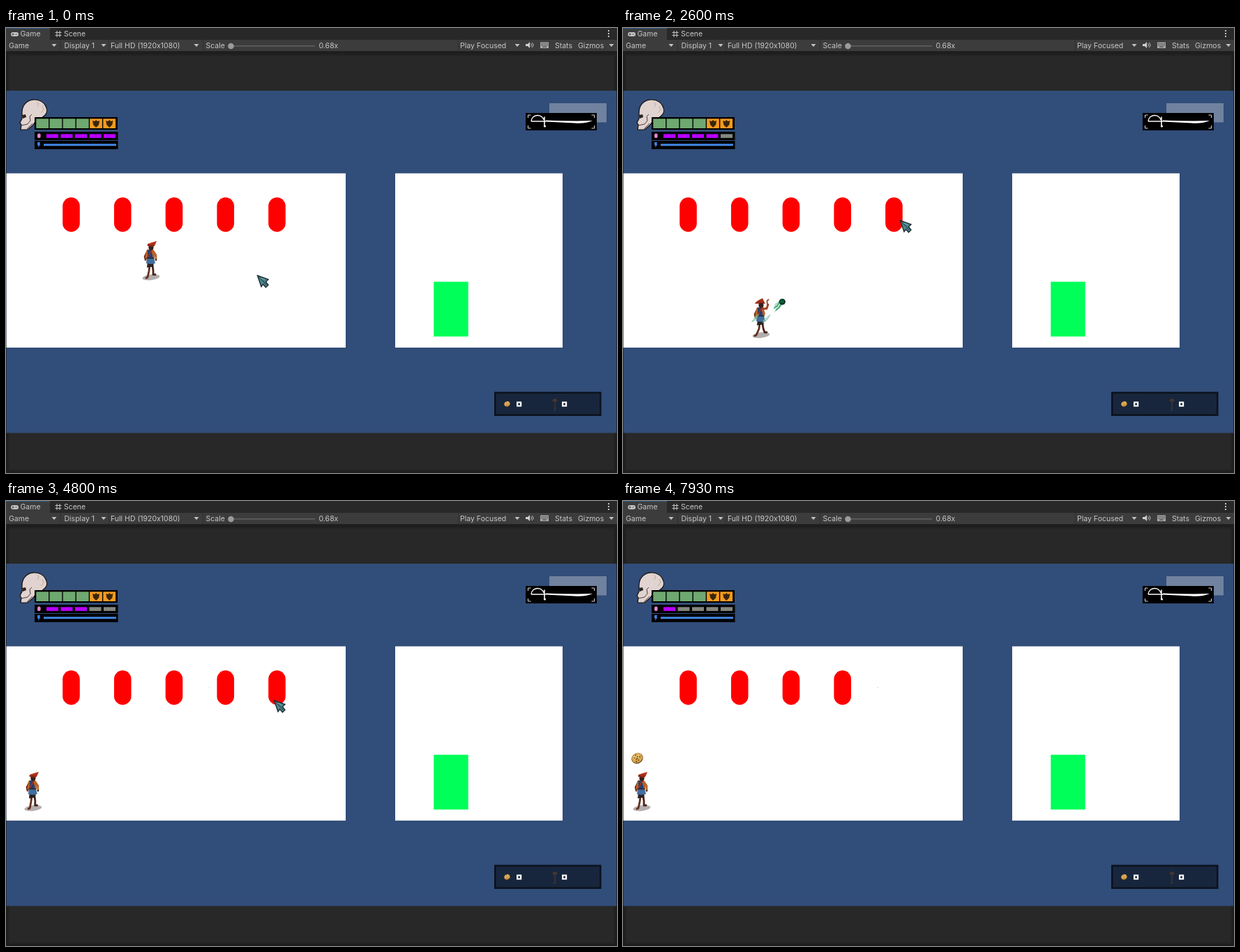
An HTML page with a canvas that plays this animation: 876x639 px, repeating every 7.99 s.

```html
<!DOCTYPE html>
<html lang="en">
<head>
<meta charset="utf-8">
<title>Game view</title>
<style>
html, body { margin: 0; width: 876px; height: 639px; overflow: hidden; background: #282828; }
canvas { display: block; }
</style>
</head>
<body>
<canvas id="stage" width="876" height="639"></canvas>
<script>
const g = document.getElementById('stage').getContext('2d');
const LOOP = 7990, STEP = LOOP / 120, SPEED = 0.375;
const ENEMIES = 5, enemyX = i => 93.5 + i * 73.75;

// key points: [ms, x, y]
const heroPath = [[250, 207, 360], [740, 207, 400], [1300, 168, 364], [2450, 197, 443], [2790, 197, 443],
  [3531, 112, 443], [3940, 112, 443], [5000, 20, 443], [5700, 20, 443], [5950, 26, 443]];
const cursorPath = [[0, 360, 355], [450, 412, 330], [1270, 387, 302], [2600, 397, 276], [3200, 396, 278],
  [3930, 322, 300], [4800, 384, 286], [6750, 389, 292], [7750, 330, 650]];
const lootPath = [[7150, 382, 282], [7900, 20.5, 369.5]];

const linear = k => k, smooth = k => k * k * (3 - 2 * k);
function along(keys, t, ease = linear) {
  let i = 0;
  while (i < keys.length - 2 && t > keys[i + 1][0]) i++;
  const [[t0, x0, y0], [t1, x1, y1]] = [keys[i], keys[i + 1]];
  const part = (t - t0) / (t1 - t0), k = ease(Math.max(0, Math.min(1, part)));
  return {
    x: x0 + (x1 - x0) * k, y: y0 + (y1 - y0) * k,
    moving: part > 0 && part < 1 && (x0 !== x1 || y0 !== y1)
  };
}

// a shot flies from the hero to the near side of an enemy
const shots = [[2490, 4], [3531, 3], [5100, 4], [6044, 4]].map(([fired, enemy]) => {
  const hero = along(heroPath, fired), x = hero.x, y = hero.y - 25;
  const dx = enemyX(enemy) - 14 - x, dy = 277 - y, len = Math.hypot(dx, dy);
  return { fired, x, y, len, ux: dx / len, uy: dy / len, angle: Math.atan2(dy, dx), hit: fired + len / SPEED };
});
const killed = shots.at(-1).hit;

function rect(x, y, w, h, color) {
  g.fillStyle = color;
  g.fillRect(x, y, w, h);
}
function pill(x, y, w, h, r, color) {
  g.beginPath();
  g.roundRect(x, y, w, h, r);
  g.fillStyle = color;
  g.fill();
}
function oval(x, y, rx, ry, color, turn = 0) {
  g.beginPath();
  g.ellipse(x, y, rx, ry, turn, 0, 7);
  g.fillStyle = color;
  g.fill();
}
function fill(d, color) {
  g.fillStyle = color;
  g.fill(new Path2D(d));
}
function line(d, color, width = 1) {
  g.strokeStyle = color;
  g.lineWidth = width;
  g.stroke(new Path2D(d));
}
function at(x, y, draw) {
  g.save();
  g.translate(x, y);
  draw();
  g.restore();
}

function toolbar() {
  rect(0, 0, 876, 639, '#282828');
  rect(0, 0, 63, 17, '#3c3c3c');
  rect(0, 0, 63, 1, '#2c5d87');
  rect(0, 17, 876, 16, '#3c3c3c');
  rect(0, 33, 876, 2, '#202020');
  for (const x of [78, 147, 282, 648]) rect(x, 17, 1, 16, '#303030');
  g.font = '10.5px Inter, sans-serif';
  g.fillStyle = '#c8c8c8';
  g.fillText('Game', 20.5, 12);
  g.fillText('Scene', 83, 12);
  for (const [label, x] of [['Game', 4], ['Display 1', 83.5], ['Full HD (1920x1080)', 150], ['Scale', 286.5],
    ['0.68x', 448.5], ['Play Focused', 651], ['Stats', 787], ['Gizmos', 820]]) g.fillText(label, x, 29);
  for (const x of [69, 140, 273, 733, 868]) fill(`M${x - 3.5} 23h7l-3.5 4z`, '#c4c4c4');
  rect(322, 25, 121, 1.5, '#626262');
  oval(322.5, 26, 4.3, 4.3, '#9b9b9b');
  pill(7, 6, 11, 6, 3, '#c4c4c4');
  line('M8.5 9h3M10 7.5v3M13.5 9h2', '#3c3c3c');
  line('M73 4v9M77 4v9M70.5 6.5h9M70.5 10.5h9', '#c4c4c4');
  for (const y of [3, 7, 11]) rect(863, y, 2, 2, '#c4c4c4');
  fill('M745 23h3l3-3v9l-3-3h-3z', '#d0d0d0');
  line('M752.5 22.5q2 2 0 4M754 21q4 3.500 0 7', '#d0d0d0');
  rect(766, 20.5, 12, 8.5, '#a8a8a8');
  for (let i = 0; i < 10; i++) rect(767 + i % 5 * 2.2, 22 + (i / 5 | 0) * 2.2, 1.2, 1.2, '#333');
  rect(769, 26.5, 6, 1, '#333');
  // soft dark rim
  for (let i = 0; i < 6; i++) {
    g.strokeStyle = `rgba(20, 20, 20, ${0.6 - i * 0.1})`;
    g.lineWidth = 1;
    g.strokeRect(i + 0.5, 35.5 + i, 875 - 2 * i, 603 - 2 * i);
  }
}

function room(t) {
  rect(0.6, 90, 874.6, 491.5, '#314d79');
  rect(0.6, 208.7, 486.4, 250.2, '#fff');
  rect(558, 208.7, 240, 250.2, '#fff');
  rect(613.3, 364.4, 49.4, 78.6, '#00ff59');
  for (let i = 0; i < ENEMIES - (t >= killed); i++) pill(enemyX(i) - 12.3, 243.3, 24.6, 49.4, 12.3, '#f00');
}

function skull() {
  const head = 'M23 121C23 108 33 102.500 42 103C57 104 62 119 56 125Q50 131 43 133L39 139L31 146H21L22 139L20 136L23 130Z';
  fill(head, '#e1d3cf');
  line(head, '#15100f', 1.2);
  fill('M23 125l5-1 1 4-5 2z', '#2a2222');
  line('M22 140l9-2 4-5-1-6 3-3M30 145l8-8', '#3a2f2d', 0.9);
  line('M44 106l3 3-2 4M52 112l2 5-4 5', '#b39f9a', 0.8);
}

function sabre() {
  rect(779, 108, 82, 27.5, '#70829f');
  rect(745, 122, 102, 25, '#000');
  for (const sx of [-1, 1]) for (const sy of [-1, 1]) {
    line(`M${796 + sx * 43.5} ${134.5 + sy * 9.5}h${sx * 4}v${-sy * 4}`, '#ddd');
  }
  fill('M774 132.500Q815 134 841 133Q832 137.500 815 136.500L774 134.500Z', '#fff');
  line('M753 134h21', '#eee', 1.6);
  line('M772 127.500v14', '#fff', 1.6);
  line('M753 134C754 123 769 123 771 132', '#fff', 1.4);
  oval(772.5, 141, 1.6, 1.6, '#fff');
}

function hud(t) {
  skull();
  rect(41, 128, 119, 18, '#000');
  for (let i = 0; i < 6; i++) {
    const x = 43.3 + i * 19.2, armor = i > 3;
    rect(x, 130.3, 17.8, 13.7, armor ? '#f49b1f' : '#6fa870');
    if (armor) fill(`M${x + 4} 133l3 1 2-2 2 2 3-1-1 6-4 4-4-4z`, '#3a260c');
  }
  for (const y of [149, 162]) rect(41, y, 119.5, 12, '#000');
  pill(45, 151.5, 4.6, 6.5, 2, '#e585cf');
  const left = ENEMIES - shots.filter(s => t >= s.fired).length;
  for (let i = 0; i < 5; i++) rect(58 + i * 20.5, 152.3, 17, 5.6, i < left ? '#b800ff' : '#83877f');
  fill('M45 164h4l-.5 3h1l-3.500 5 .5-3.500h-1.500z', '#3d7fe0');
  rect(54, 166.3, 104, 3, '#4389e6');
  sabre();

  rect(700, 522.5, 153.5, 34.5, '#0a111c');
  rect(702.5, 525, 148.5, 29.5, '#18263d');
  cookie(718.5, 540, 0.52);
  for (const x of [732, 797]) {
    rect(x, 536.5, 7.2, 7.2, '#fff');
    rect(x + 2.2, 538.7, 2.8, 2.8, '#18263d');
  }
  line('M787 537l-3-2 2-2 1 2 1-2 2 2zM787 538v11h-2', '#553b2b', 1.1);
}

function cookie(x, y, size) {
  at(x, y, () => {
    g.scale(size, size);
    oval(0, 0, 8.5, 7.4, '#6d481c', -0.5);
    oval(-0.2, -0.5, 7.8, 6.6, '#dca94f', -0.5);
    oval(-1, -2, 5, 3, '#edc777', -0.5);
    for (let i = 0; i < 8; i++) {
      const r = 1.9 * Math.sqrt(i);
      oval(r * Math.cos(i * 2.4), r * Math.sin(i * 2.4), 1.1, 0.9, '#704518');
    }
  });
}

function hero(t) {
  const { x, y, moving } = along(heroPath, t);
  const shot = shots.find(s => t >= s.fired - 60 && t < s.fired + 410);
  const stride = shot ? 6 : moving ? 4 + 3 * Math.cos(t / 105) : 4;
  at(x, y, () => {
    g.lineCap = g.lineJoin = 'round';
    oval(1, -2, 12.5, 4, '#b3aeac', -0.12);
    line(`M3 -19L4 -12L${stride} -6l3 0`, '#4a251c', 2.8);
    line(`M-1 -19L-2 -11L${-stride} -2l-2 1`, '#63301f', 2.8);
    fill('M-4 -25h9l-1 9-3-1-6 1z', '#2d2121');
    line('M-4 -40l-4 8 1 5', '#7a3018', 2.6);
    fill('M-5 -42h9l3 9-2 5h-11l-1-6z', '#b8632a');
    fill('M-4 -41l5-1 3 13h-8z', '#23406f');
    line('M2 -41l-6 10', '#a52c1b', 1.6);
    fill('M-5 -30h10l2 8-6 1-7-1z', '#416f9f');
    line('M-5 -29.500h10', '#302422', 1.4);
    oval(1, -45, 3.6, 4, '#35211c');
    if (shot) {
      const steep = shot.angle < -0.5;
      line(steep ? 'M3 -40l6 0 2-6' : 'M3 -41l8 2 5-2', '#a83d1d', 2.8);
      line(steep ? 'M10 -45l-.5-6 2-2' : 'M16 -41l9-2', '#91602f', 2);
      fill('M-8 -48l5-4 6-3 2 4 2 4-5-1-9 1z', '#a62e18');
    } else {
      line('M4 -40l4 6 0 6', '#b9642a', 2.6);
      oval(8, -27, 1.4, 1.4, '#4a2b1e');
      fill('M-4 -50l6-2 7-2-2 5-2 3-9-1z', '#b9301a');
    }
    line('M-4 -48h9', '#592015');
  });
}

function bolt(s, t) {
  if (t < s.fired || t > s.hit + 900) return;
  const gone = (t - s.fired) * SPEED, head = Math.min(gone, s.len);
  const px = d => s.x + s.ux * d, py = d => s.y + s.uy * d;
  for (let d = 2; d < head - 18; d += 44) {
    g.globalAlpha = Math.max(0, 0.9 - (gone - d) / 170);
    for (const side of [-8, 7]) at(px(d) + side, py(d) + side * 0.1, () => {
      fill('M-6 6Q-4 -1 5 -6Q1 3 -6 6', '#9bd5b0');
      line('M-6 6Q3 2 5 -6', '#257957', 0.8);
    });
  }
  g.globalAlpha = 1;
  const x = px(head), y = py(head);
  if (t < s.hit) {
    at(x, y, () => {
      g.rotate(s.angle);
      fill('M0 -4L-10 -4L-17 0L-12 1L-19 5L-8 5L0 3Z', '#8fd0acb0');
      line('M-4 -2l-5 2-6 0M-4 2l-6 2-5 0', '#2d8a66', 1.2);
    });
    oval(x, y, 4.6, 4.4, '#062d20');
    oval(x - 0.3, y - 0.3, 3, 2.8, '#0b6236');
  } else {
    const r = Math.max(0.5, 4.5 * (1 - (t - s.hit) / 250));
    oval(x - 9, y - 9, r, r, '#7da591');
  }
}

function cursor(t) {
  const { x, y } = along(cursorPath, t, smooth);
  at(x, y, () => {
    const arrow = 'M.5 .5L16 6L12.500 9.500L16 14L12.500 17.500L8.500 13L6 16.500Z';
    fill(arrow, '#4f858b');
    line('M3 3l6 6 4 5', '#2c545d', 1.4);
    line('M5 4l6 2', '#83b3b5');
    line(arrow, '#1b2b32', 1.4);
  });
}

function draw(now) {
  const t = Math.floor(now % LOOP / STEP) * STEP;
  toolbar();
  room(t);
  hud(t);
  hero(t);
  for (const s of shots) bolt(s, t);
  if (t >= killed) {
    const loot = along(lootPath, t);
    cookie(loot.x, loot.y, 1);
  }
  cursor(t);
}

let start;
function tick(now) {
  start ??= now;
  draw(now - start);
  requestAnimationFrame(tick);
}
requestAnimationFrame(tick);
</script>
</body>
</html>
```
